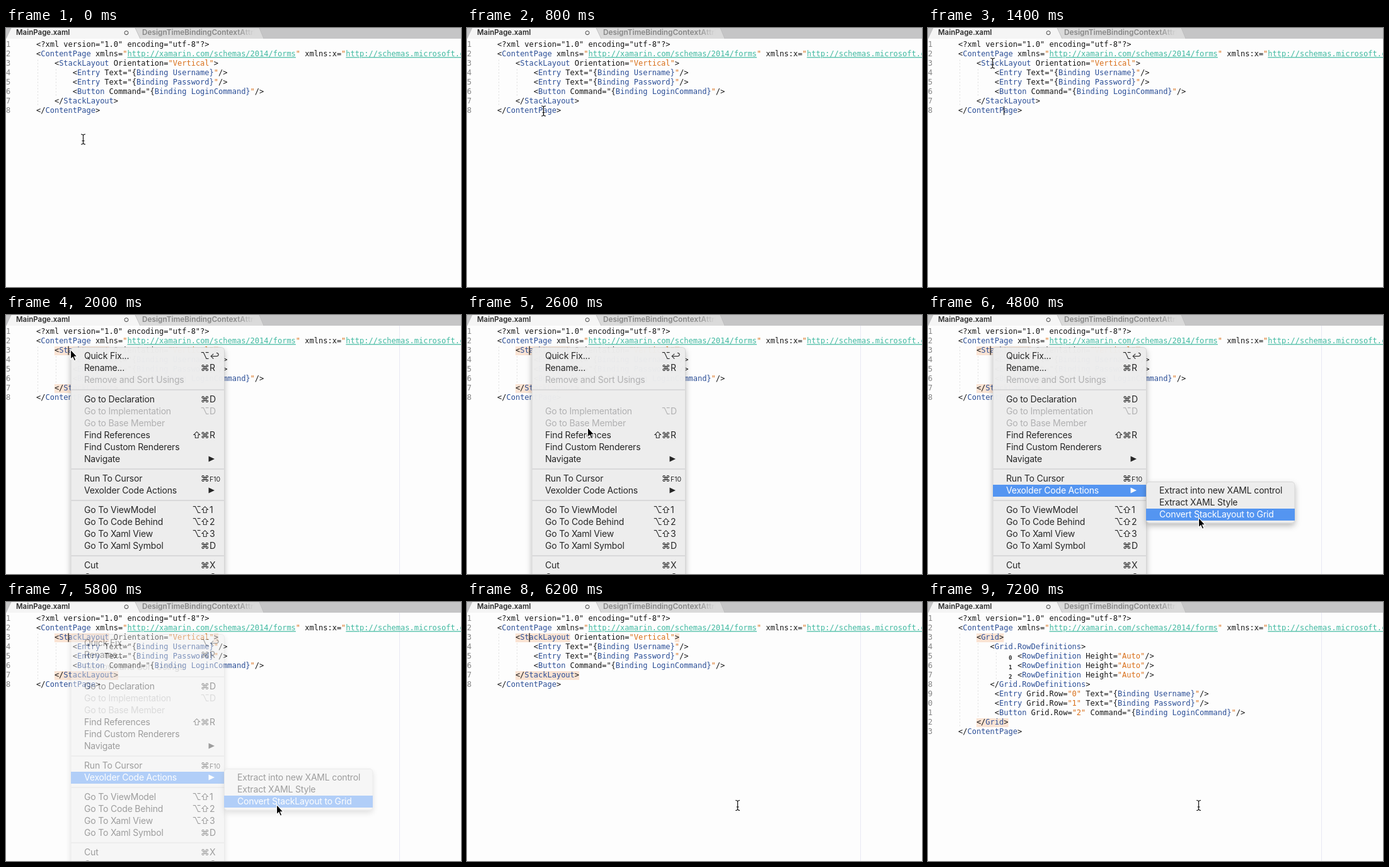
These frames come from a looping animation (722 px wide and 412 px high, 7600 ms). An HTML page:

```html
<!DOCTYPE html>
<html lang="en">
<head>
<meta charset="utf-8">
<title>Convert a layout to a grid</title>
<style>
html, body { margin: 0; width: 100%; height: 100%; overflow: hidden; background: #fdfdfd; }
svg { display: block; width: 722px; height: 412px; }
text { white-space: pre; }
.code { font: 12px "DejaVu Sans Mono", monospace; fill: #161616; }
.num { fill: #858585; }
.tag { fill: #2c4f97; }
.str { fill: #d9701b; }
.url { fill: #3fb9a0; text-decoration: underline; }
.mark { font: bold 9px "DejaVu Sans Mono", monospace; fill: #222; }
.tab { font: 600 11.5px Inter, sans-serif; }
.idle { font-size: 11.8px; }
.ui { font: 14px Inter, "DejaVu Sans", sans-serif; letter-spacing: -0.18px; fill: #262626; }
.key { font: 14px Inter, "DejaVu Sans", sans-serif; fill: #262626; }
.small { font-size: 10.5px; }
.off { fill: #b0b0b1; }
.on { fill: #fff; }
</style>
</head>
<body>
<svg id="stage" viewBox="0 0 722 412">
  <defs>
    <linearGradient id="fade" gradientUnits="userSpaceOnUse" x1="365" x2="394" y1="0" y2="0">
      <stop offset="0" stop-color="#868686"/><stop offset="1" stop-color="#d9d9d9"/>
    </linearGradient>
    <filter id="shadow" x="-15%" y="-15%" width="130%" height="140%">
      <feDropShadow dx="0" dy="4" stdDeviation="5" flood-color="#000" flood-opacity=".28"/>
    </filter>
  </defs>
  <rect width="722" height="412" fill="#fdfdfd"/>
  <g id="editor"></g>
  <g id="tabs">
    <rect width="722" height="17" fill="#c5c5c6"/>
    <path d="M200 0H402L409 17H200Z" fill="#dadada"/>
    <path d="M0 17L8 0H205L213 17Z" fill="#f5f5f5"/>
    <path d="M0 17L8 0M205 0L213 17M402 0L409 17" fill="none" stroke="#b9b9ba" stroke-width=".8"/>
    <text class="tab" x="16" y="11.4" fill="#2b2b2b">MainPage.xaml</text>
    <circle cx="191" cy="7.7" r="3" fill="none" stroke="#444" stroke-width="1"/>
    <text class="tab idle" x="216" y="11.4" fill="url(#fade)">DesignTimeBindingContextAttri</text>
  </g>
  <g id="menus"></g>
  <g id="pointer"></g>
</svg>
<script>
const LOOP = 7600, STEP = 200, CH = 7.224, LEFT = 48, BLUE = '#5495f1';
const $ = id => document.getElementById(id);
const esc = s => s.replace(/&/g, '&amp;').replace(/</g, '&lt;');
const colX = col => LEFT + col * CH;
const rowY = row => 26.5 + 15 * row;

const head = [
  [0, '<?xml version="1.0" encoding="utf-8"?>'],
  [0, '<ContentPage xmlns="http://xamarin.com/schemas/2014/forms" xmlns:x="http://schemas.microsoft.com/winfx/2009/xaml">']
];
const before = [...head,
  [4, '<StackLayout Orientation="Vertical">'],
  [8, '<Entry Text="{Binding Username}"/>'],
  [8, '<Entry Text="{Binding Password}"/>'],
  [8, '<Button Command="{Binding LoginCommand}"/>'],
  [4, '</StackLayout>'],
  [0, '</ContentPage>']
];
const after = [...head,
  [4, '<Grid>'],
  [7, '<Grid.RowDefinitions>'],
  ...[0, 1, 2].map(() => [13, '<RowDefinition Height="Auto"/>']),
  [7, '</Grid.RowDefinitions>'],
  [8, '<Entry Grid.Row="0" Text="{Binding Username}"/>'],
  [8, '<Entry Grid.Row="1" Text="{Binding Password}"/>'],
  [8, '<Button Grid.Row="2" Command="{Binding LoginCommand}"/>'],
  [4, '</Grid>'],
  [0, '</ContentPage>']
];

// label, centre y, modifiers, key, disabled
const items = [
  ['Quick Fix...', 65, '⌥', '↩'],
  ['Rename...', 84, '⌘', 'R'],
  ['Remove and Sort Usings', 103, '', '', true],
  ['Go to Declaration', 134, '⌘', 'D'],
  ['Go to Implementation', 153, '⌥', 'D', true],
  ['Go to Base Member', 172, '', '', true],
  ['Find References', 191, '⇧⌘', 'R'],
  ['Find Custom Renderers', 210, '', ''],
  ['Navigate', 229, '', '▶'],
  ['Run To Cursor', 260, '⌘', 'F10'],
  ['Vexolder Code Actions', 279, '', '▶'],
  ['Go To ViewModel', 310, '⌥⇧', '1'],
  ['Go To Code Behind', 329, '⌥⇧', '2'],
  ['Go To Xaml View', 348, '⌥⇧', '3'],
  ['Go To Xaml Symbol', 367, '⌘', 'D'],
  ['Cut', 398, '⌘', 'X'],
  ['Copy', 417, '⌘', 'C']
];
const actions = [
  ['Extract into new XAML control', 279],
  ['Extract XAML Style', 298],
  ['Convert StackLayout to Grid', 317]
];

// time, x, y
const path = [
  [0, 122, 177], [200, 122, 175], [600, 121, 132], [800, 121, 132], [1200, 103, 58],
  [1400, 102, 56], [2000, 102, 56], [2400, 165, 136], [2600, 191, 180],
  [3200, 241, 275], [3600, 244, 280], [4000, 244, 280], [4400, 372, 282],
  [4800, 429, 323.5], [LOOP, 429, 323.5]
];

function pointAt(t) {
  const i = path.findIndex(p => p[0] > t);
  const [t0, x0, y0] = path[i - 1], [t1, x1, y1] = path[i];
  const k = (t - t0) / (t1 - t0);
  return [x0 + (x1 - x0) * k, y0 + (y1 - y0) * k];
}

const span = (cls, s) => `<tspan class="${cls}">${esc(s)}</tspan>`;
const text = (cls, x, y, s, extra = '') => `<text class="${cls}" x="${x}" y="${y}" ${extra}>${s}</text>`;
const box = (x, y, w, h, fill) => `<rect x="${x}" y="${y}" width="${w}" height="${h}" fill="${fill}"/>`;

function paint(line) {
  const re = /(<\/?)([A-Z][\w.]*)|("\{)(Binding \w+\})(")|(")(http[^"]*)(")|("\w+")/g;
  let out = '', last = 0;
  for (const m of line.matchAll(re)) {
    out += esc(line.slice(last, m.index));
    if (m[1]) out += esc(m[1]) + span('tag', m[2]);
    else if (m[3]) out += m[3] + span('tag', m[4]) + span('str', m[5]);
    else if (m[6]) out += span('str', m[6]) + span('url', m[7]) + span('str', m[8]);
    else out += span('str', m[9]);
    last = m.index + m[0].length;
  }
  return out + esc(line.slice(last));
}

const glow = (col, row, n) => box(colX(col), rowY(row) - 6.5, n * CH, 14, '#fae3d3');
const guide = (col, from, to) => `<path d="M${colX(col) + 2.5} ${rowY(from) - 6}V${rowY(to) + 7}" stroke="#dcdcdc" stroke-dasharray="2 3"/>`;
const caret = (x, row) => box(x, rowY(row) - 7, 1.2, 14, '#111');

function drawEditor(t) {
  const done = t >= 6600, lines = done ? after : before;
  let s = '';
  if (t >= 1600) s += box(624, 17, 1, 395, '#e9e9f3');
  if (done) {
    if (t >= 6800) s += glow(4, 2, 6) + glow(4, 11, 7);
    s += guide(0, 2, 11) + guide(4, 3, 10) + guide(8, 4, 6);
  } else {
    if (t >= 1600) s += glow(4, 2, 12) + glow(39, 2, 1) + glow(4, 6, 14);
    s += guide(0, 2, 6) + guide(4, 3, 5);
  }
  lines.forEach(([col, line], i) => {
    const y = rowY(i) + 3.7;
    s += text('code num', 7.2, y, i + 1, 'text-anchor="end"');
    s += text('code', colX(col), y, paint(line));
  });
  if (t >= 6800) [0, 1, 2].forEach(n => s += text('mark', 128, rowY(4 + n) + 5.5, n));
  if (t >= 800 && t < 1600) s += caret(120, 7);
  if (t >= 1600 && t < 6600) s += caret(98.5, 2);
  $('editor').innerHTML = s;
}

function drawItem([label, cy, mods, key, off], on, blank) {
  const cls = on ? ' on' : off ? ' off' : '', y = cy + 5;
  let s = on ? box(103, cy - 9, 243, 19, BLUE) : '';
  if (blank) return s;
  s += text('ui' + cls, 124, y, label);
  [...mods].reverse().forEach((g, i) => s += text('key' + cls, 315.7 - 13 * i, y, g, 'text-anchor="middle"'));
  if (key === '▶') s += `<path class="ui${cls}" d="M321.5 ${cy - 4.5}L331 ${cy}L321.5 ${cy + 4.5}Z"/>`;
  else if (key) s += text((key === 'F10' ? 'key small' : 'key') + cls, 323, y, key);
  return s;
}

const panel = (x, y, w, h) => `<rect x="${x}" y="${y}" width="${w}" height="${h}" rx="5" fill="#eeeeee" fill-opacity=".97" stroke="#c4c4c4" stroke-width=".6" filter="url(#shadow)"/>`;

function drawMenus(t, x, y) {
  const open = t >= 1800 && t < 6000;
  $('menus').setAttribute('opacity', t >= 5800 ? .45 : 1);
  if (!open) return $('menus').innerHTML = '';
  const sub = t >= 3400, over = cy => Math.abs(y - cy) <= 9.5;
  let s = panel(103, 51.5, 243.5, 400);
  [119, 245, 295, 383].forEach(cy => s += box(103, cy - 1, 243.5, 2, '#d9d9da'));
  items.forEach(it => {
    const hot = sub ? it[1] === 279 : x > 103 && over(it[1]) && !it[4];
    s += drawItem(it, hot, t === 2600 && it[1] === 134);
  });
  if (sub) {
    s += panel(346.5, 265.5, 235.5, 65.5);
    actions.forEach(([label, cy]) => {
      const on = x > 347 && over(cy) && t !== 5400;
      if (on) s += box(346, cy - 9, 236, 19, BLUE);
      s += text(on ? 'ui on' : 'ui', 367, cy + 5, label);
    });
  }
  $('menus').innerHTML = s;
}

function drawPointer(t, x, y) {
  const arrow = t >= 1800 && t < 6000;
  const beam = 'M-3.5 -8Q0 -8 0 -5.5Q0 -8 3.5 -8M0 -6V6M-3.5 8Q0 8 0 5.5Q0 8 3.5 8M-2 2.5H2';
  const shape = arrow
    ? '<path d="M0 -1V14.5L3.4 11.3L5.8 16.8L8.3 15.7L6 10.4H10.6Z" fill="#000" stroke="#fff" stroke-width="1.1"/>'
    : `<path d="${beam}" fill="none" stroke="#fff" stroke-width="2.6"/><path d="${beam}" fill="none" stroke="#111" stroke-width="1.2"/>`;
  $('pointer').innerHTML = `<g transform="translate(${x + .5} ${y})">${shape}</g>`;
}

let shown = -1;
function draw(now) {
  const t = Math.floor(now % LOOP / STEP) * STEP;
  if (t === shown) return;
  shown = t;
  const [x, y] = pointAt(t);
  drawEditor(t);
  drawMenus(t, x, y);
  drawPointer(t, x, y);
}

draw(0);
let start;
requestAnimationFrame(function tick(now) {
  start ??= now;
  draw(now - start);
  requestAnimationFrame(tick);
});
</script>
</body>
</html>
```
